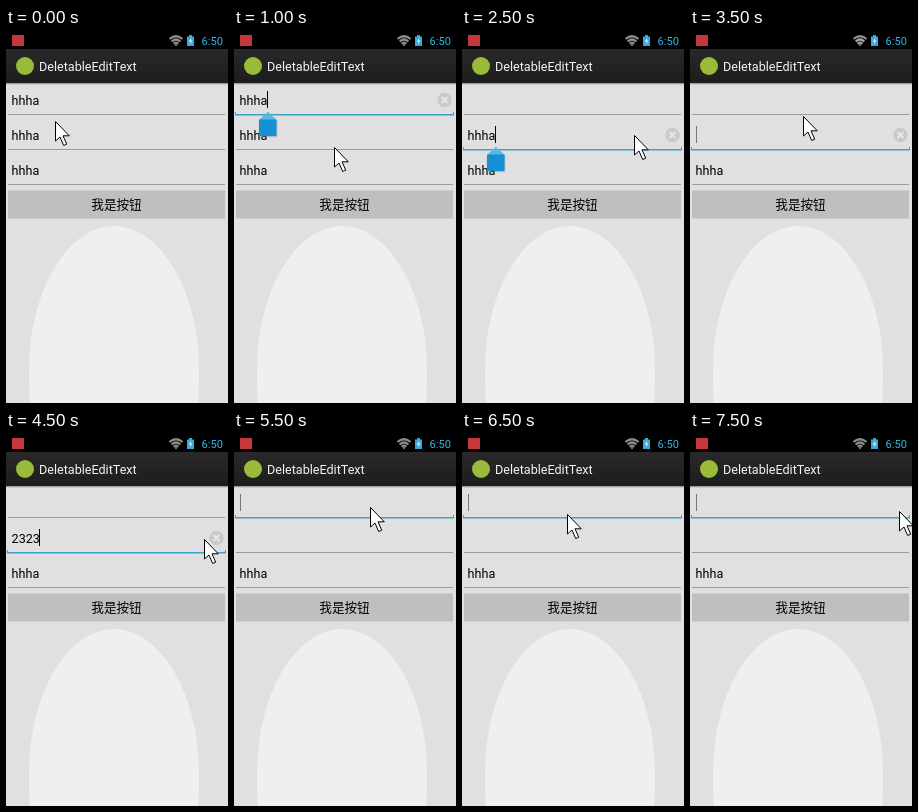
Recreate the animation shown at these times as an HTML page. Size 222x375 px, loop 8000 ms.

```html
<!DOCTYPE html>
<html lang="en">
<head>
<meta charset="utf-8">
<title>DeletableEditText</title>
<style>
html, body { margin: 0; width: 100%; height: 100%; overflow: hidden; background: #e0e0e0; }
svg { display: block; width: 222px; height: 375px; }
text { font: 12.6px Roboto, "Noto Sans CJK SC", "Noto Sans CJK", sans-serif; }
.clock { font-size: 11.1px; fill: #33b5e5; }
.line { fill: #9c9c9c; }
.focused .line { fill: #3aa3d0; }
.tick { visibility: hidden; }
.focused .tick { visibility: visible; }
</style>
</head>
<body>
<svg viewBox="0 0 222 375">
  <defs>
    <linearGradient id="bar" x2="0" y2="1"><stop stop-color="#292929"/><stop offset="1" stop-color="#1d1d1d"/></linearGradient>
    <linearGradient id="shade" x2="0" y2="1"><stop stop-color="#888"/><stop offset="1" stop-color="#e0e0e0"/></linearGradient>
  </defs>
  <rect width="222" height="375" fill="#e0e0e0"/>
  <rect x="23" y="198" width="170" height="300" rx="85" ry="145" fill="#efefef"/>

  <rect width="222" height="21" fill="#000"/>
  <rect x="6" y="7" width="12" height="11" fill="#c4373b"/>
  <g fill="none" stroke="#8c8c8c" stroke-width="2.2">
    <path d="M163.500 11Q170 5.500 176.500 11"/>
    <path id="arc" d="M165.700 13.500Q170 9.500 174.300 13.500M167.700 15.800Q170 13.500 172.300 15.800"/>
    <path d="M168.300 16.300L170 18.500L171.700 16.300Z" fill="#8c8c8c" stroke="none"/>
  </g>
  <path d="M183 7h3v1.500h2v9.500h-7v-9.500h2z" fill="#33a9dc"/>
  <path d="M185.500 9.500l-3 4h2l-1 3.500 3.200-4.500h-2z" fill="#d5eef9"/>
  <text class="clock" x="195.500" y="17">6:50</text>

  <rect y="21" width="222" height="34" fill="url(#bar)"/>
  <rect y="55" width="222" height="2" fill="url(#shade)"/>
  <circle cx="19" cy="38" r="9" fill="#9abb3a"/>
  <text x="33" y="42.500" fill="#f3f3f3">DeletableEditText</text>

  <g id="fields"></g>
  <rect x="2" y="162.500" width="217" height="28" fill="#bfbfbf"/>
  <text x="110.500" y="181" text-anchor="middle">我是按钮</text>

  <g id="clear">
    <circle cx="210.500" cy="72" r="7.200" fill="#c9c9c9"/>
    <path d="M207.500 69l6 6m0-6l-6 6" stroke="#e8e8e8" stroke-width="2"/>
  </g>
  <rect id="caret" y="63" width="1" height="17"/>
  <g id="handle">
    <path d="M25 92l8.700-8 8.800 8v16.500H25z" fill="#777" stroke="#777" opacity=".4" transform="translate(.3 .3)"/>
    <path d="M25 92l8.700-8L42.500 92z" fill="#55b9e6"/>
    <rect x="25" y="91.500" width="17.500" height="16.500" rx="1" fill="#1590d4"/>
  </g>
  <path id="mouse" d="M.5.5V20L5 16l3.700 8.500 3-1.300L8 14.800h6.300z" fill="#fff" stroke="#000"/>
</svg>
<script>
const STEP = 500, ROW = 35;
const $ = id => document.getElementById(id);

$('fields').innerHTML = [0, 1, 2].map(i => `<g transform="translate(0 ${i * ROW})">
  <text x="5.600" y="76.700">hhha</text>
  <rect class="line" x="2" y="86" width="217" height="1"/>
  <path class="line tick" d="M1 84h1v2.500h217V84h1v3.500H1z"/></g>`).join('');
const fields = [...$('fields').children];

// mouse x, mouse y, focused field, its text, caret shown, clear icon shown
const steps = [
  [49, 93, 0, '', 0, 0],
  [52, 81, 0, '', 0, 0],
  [100, 119, 1, 'hhha', 1, 1],
  [207, 68, 1, 'hhha', 0, 1],
  [205, 110, 1, '', 1, 0],
  [172, 107, 2, 'hhha', 1, 1],
  [207, 102, 2, 'hhha', 0, 1],
  [113, 88, 2, '', 1, 1],
  [113, 80, 2, '23', 1, 1],
  [198, 108, 2, '2323', 1, 1],
  [183, 87, 2, '', 1, 1],
  [136, 76, 1, '', 1, 0],
  [110, 115, 2, '', 1, 0],
  [105, 83, 1, '', 1, 0],
  [201, 88, 1, '', 0, 0],
  [209, 80, 1, '', 1, 0]
];

const show = (el, on) => { el.style.visibility = on ? 'visible' : 'hidden'; };
const move = (el, x, y) => el.setAttribute('transform', `translate(${x} ${y})`);

function draw(n) {
  const [x, y, focus, text, caret, clear] = steps[n];
  const texts = ['hhha', 'hhha', 'hhha'];
  // each field keeps what it last held
  for (const s of steps.slice(0, n + 1)) if (s[2]) texts[s[2] - 1] = s[3];
  fields.forEach((f, i) => {
    f.classList.toggle('focused', i === focus - 1);
    f.querySelector('text').textContent = texts[i];
  });
  const top = (focus - 1) * ROW;
  move($('mouse'), x, y);
  move($('caret'), 6 + text.length * 6.75, top);
  $('caret').setAttribute('fill', text ? '#000' : '#777');
  move($('handle'), 0, top);
  move($('clear'), 0, top);
  show($('caret'), caret);
  show($('handle'), text === 'hhha');
  show($('clear'), clear);
  // signal flickers while typing
  $('arc').style.stroke = n === 7 || n === 8 ? '#a6a6a6' : '';
}

let last = -1;
const start = performance.now();
function tick() {
  const n = Math.floor((performance.now() - start) / STEP) % steps.length;
  if (n !== last) draw(last = n);
  requestAnimationFrame(tick);
}
tick();
</script>
</body>
</html>
```
